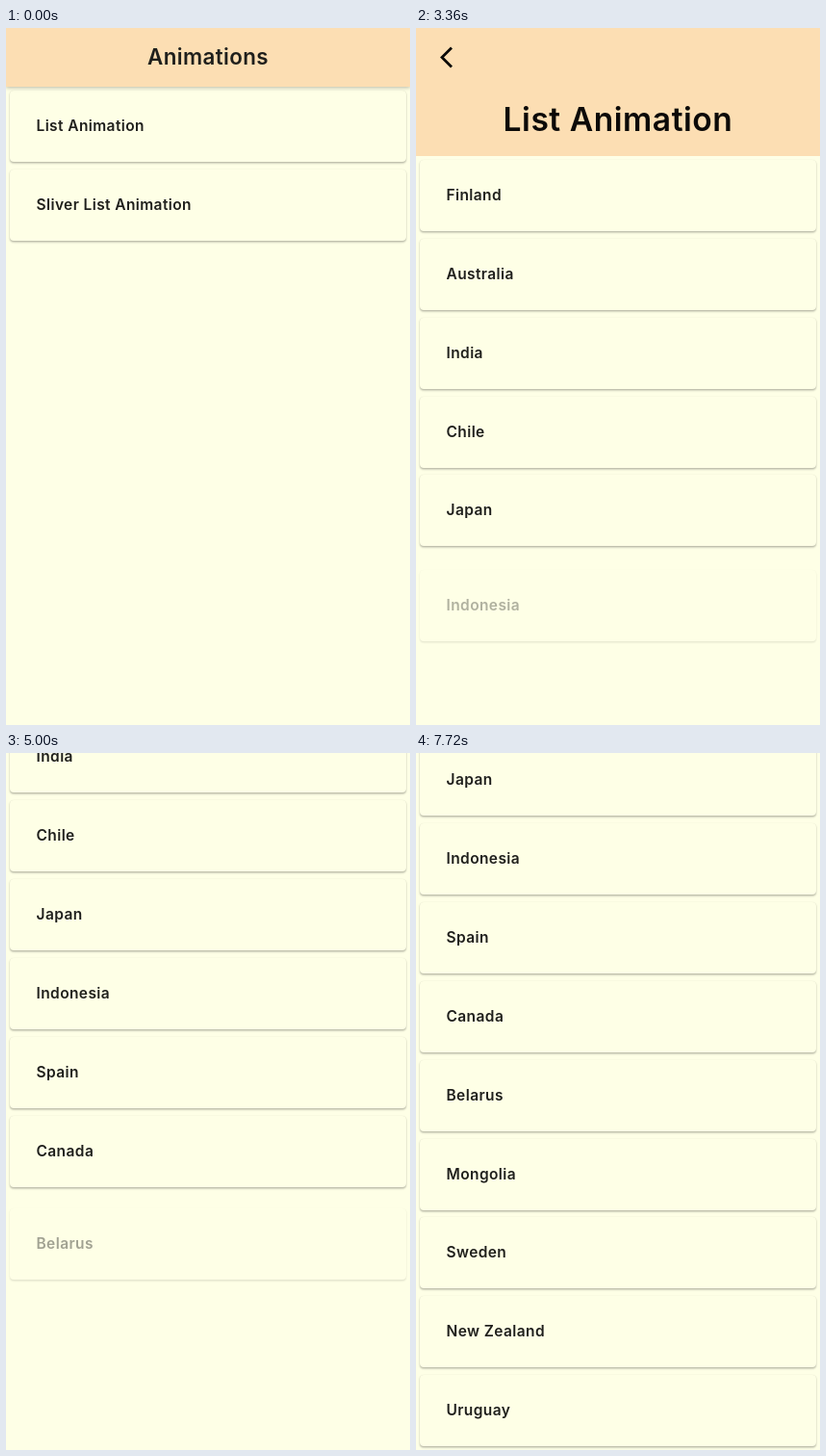
Recreate the animation shown at these times as an HTML page. Size 420 px wide and 724 px high, loop 8.32 s.

```html
<!DOCTYPE html>
<html lang="en">
<head>
<meta charset="utf-8">
<title>List animations</title>
<style>
  html, body { margin: 0; width: 100%; height: 100%; overflow: hidden; background: #feffe6; }
  #stage { position: relative; width: 420px; height: 724px; overflow: hidden; font: 600 15.5px Inter, sans-serif; color: #1f1f1c; }
  .page { position: absolute; inset: 0; overflow: hidden; background: #feffe6; }
  .bar { position: absolute; z-index: 1; left: 0; top: 0; width: 100%; height: 61px; background: #fcdeb3; }
  #home .bar { box-shadow: 0 1px 4px rgba(0, 0, 0, .28); }
  .title { position: absolute; left: 0; width: 100%; top: 0; line-height: 60px; text-align: center; font-size: 22.4px; letter-spacing: .35px; white-space: nowrap; }
  #list .title { color: #0c0a08; }
  .back { position: absolute; left: 0; top: 0; fill: none; stroke: #0c0a08; stroke-width: 2.8; }
  .card { position: absolute; left: 4px; top: 0; width: 412px; height: 74px; box-sizing: border-box; padding-left: 27.5px;
    line-height: 74px; letter-spacing: .4px; border-radius: 4px; background: #feffe6;
    box-shadow: 0 1.5px 2px rgba(0, 0, 0, .27), 0 0 1px rgba(0, 0, 0, .12); }
</style>
</head>
<body>
<div id="stage">
  <div class="page" id="home">
    <div class="bar"><div class="title">Animations</div></div>
  </div>
  <div class="page" id="list">
    <div class="bar">
      <svg class="back" width="60" height="61"><path d="M37 20.5L27 30.5L37 40.5"/></svg>
      <div class="title">List Animation</div>
    </div>
  </div>
</div>
<script>
const LOOP = 8320, PUSH = 1465, PUSH_TIME = 400, FADE = 250, STEP = 255;
const PITCH = 81.86, BAR = 61, TALL_BAR = 133, RISE = 25;
const countries = ['Finland', 'Australia', 'India', 'Chile', 'Japan', 'Indonesia', 'Spain',
  'Canada', 'Belarus', 'Mongolia', 'Sweden', 'New Zealand', 'Uruguay'];
// Scroll keys: time, offset, speed in px/ms
const scrollKeys = [[3980, 0, 0], [4400, 110, .34], [5000, 333, .37], [5440, 471, .02], [5700, 473.2, 0]];

const home = document.getElementById('home');
const list = document.getElementById('list');
const bar = list.querySelector('.bar');
const title = list.querySelector('.title');
const clamp = x => Math.max(0, Math.min(1, x));
const moveY = (el, y) => { el.style.transform = `translateY(${y}px)`; };

function addCard(page, text) {
  const card = document.createElement('div');
  card.className = 'card';
  card.textContent = text;
  page.append(card);
  return card;
}

['List Animation', 'Sliver List Animation'].forEach((text, i) =>
  moveY(addCard(home, text), Math.round(BAR + 4 + i * PITCH)));
const cards = countries.map(text => addCard(list, text));

// Cards appear in three batches, each as it scrolls into view
function startOf(i) {
  const [first, time] = i < 8 ? [0, 2000] : i < 10 ? [8, 4898] : [10, 5900];
  return time + (i - first) * STEP;
}

// Cubic bezier (.35,.91) (.33,.97), solved for x by bisection
function easeOut(x) {
  const bezier = (a, b, u) => 3 * a * u * (1 - u) ** 2 + 3 * b * u * u * (1 - u) + u ** 3;
  let low = 0, high = 1;
  for (let i = 0; i < 20; i++) {
    const mid = (low + high) / 2;
    if (bezier(.35, .33, mid) < x) low = mid; else high = mid;
  }
  return bezier(.91, .97, low);
}

function scrollAt(t) {
  const last = scrollKeys.at(-1);
  if (t <= scrollKeys[0][0]) return 0;
  if (t >= last[0]) return last[1];
  const i = scrollKeys.findIndex(key => key[0] > t);
  const [t0, y0, v0] = scrollKeys[i - 1], [t1, y1, v1] = scrollKeys[i];
  const d = t1 - t0, u = (t - t0) / d, w = 1 - u;
  return y0 * w * w * (1 + 2 * u) + v0 * d * u * w * w + y1 * u * u * (3 - 2 * u) - v1 * d * u * u * w;
}

function render(t) {
  const raw = clamp((t - PUSH) / PUSH_TIME);
  const push = raw > 0 && raw < 1 ? easeOut(raw) : raw;
  home.style.transform = `translateX(${-140 * push}px)`;
  list.style.transform = `translateX(${420 * (1 - push)}px)`;
  list.style.visibility = push > 0 ? 'visible' : 'hidden';

  // The bar shrinks to toolbar height, then leaves the screen
  const scroll = scrollAt(t);
  const open = 1 - clamp(scroll / (TALL_BAR - BAR));
  bar.style.height = BAR + (TALL_BAR - BAR) * open + 'px';
  moveY(bar, -Math.max(0, scroll - (TALL_BAR - BAR)));
  title.style.transform = `translateY(${65 * open}px) scale(${1 + open / 2})`;

  cards.forEach((card, i) => {
    const shown = clamp((t - startOf(i)) / FADE);
    card.style.opacity = shown;
    moveY(card, Math.round(TALL_BAR + 4 + i * PITCH - scroll + RISE * (1 - shown)));
  });
}

function frame() {
  render(performance.now() % LOOP);
  requestAnimationFrame(frame);
}
frame();
</script>
</body>
</html>
```
